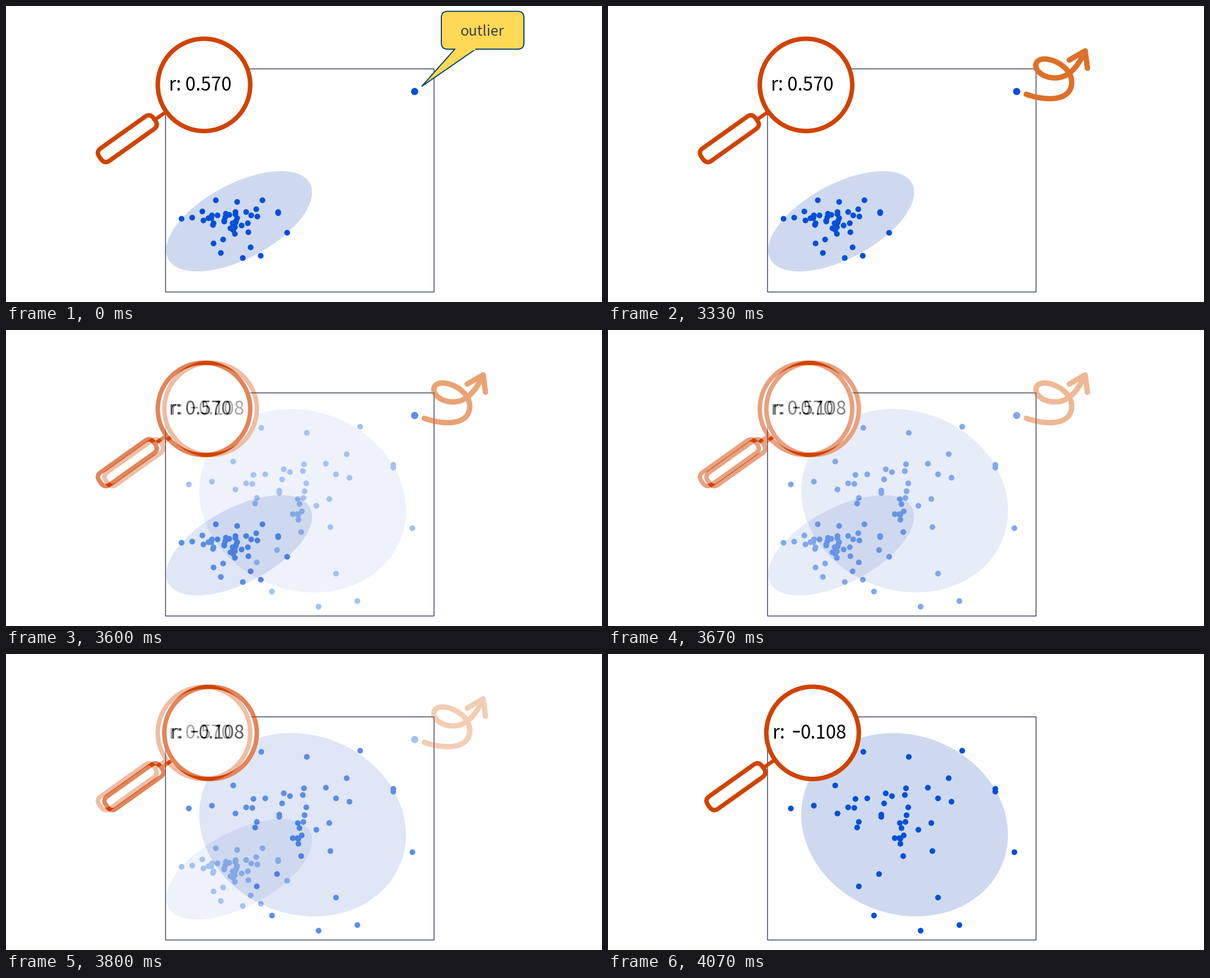
Recreate the animation shown at these times as a matplotlib script. Size 1061 px wide and 528 px high, loop 8.07 s.

```python
import numpy as np
import matplotlib.pyplot as plt
from matplotlib.animation import FuncAnimation
from matplotlib.patches import Circle, Ellipse, FancyBboxPatch, PathPatch, Rectangle
from matplotlib.path import Path
from matplotlib.transforms import Affine2D

W, H, DPI = 1061, 528, 64
PX = 72 / DPI  # points per pixel
LOOP, INTERVAL = 8070, 30
ARROW_AT, FADE_AT, STEP, STEPS = 1600, 3325, 200 / 3, 10

BLUE, PALE, NAVY = "#0050d7", "#ced9f0", "#2f3b5c"
RUST, ORANGE, YELLOW = "#d04300", "#de7028", "#ffd955"

plt.rcParams["font.family"] = ["Noto Sans CJK JP", "DejaVu Sans"]

# The rim of the cloud is fixed, its core is random.
RIM = [(325, 275), (454, 174), (535, 183), (630, 172), (689, 240), (689, 245),
       (723, 353), (625, 483), (556, 493), (473, 466), (587, 434), (446, 414)]
core = np.random.default_rng(7).normal((522, 296), (62, 48), (35, 2))
CLOUD = np.vstack([RIM, core])
# The outlier stretches both axes, so the same cloud shrinks.
SQUEEZED = (CLOUD - (325, 275)) * (0.4724, 0.3211) + (312, 379)

fig = plt.figure(figsize=(W / DPI, H / DPI), dpi=DPI, facecolor="white")


def text(ax, x, y, s, size, color="black", ha="left"):
    ax.text(x, y, s, fontsize=size * PX, color=color, ha=ha, va="baseline",
            zorder=8)


def dots(ax, points, diameter):
    x, y = np.transpose(points) - 0.3
    ax.scatter(x, y, s=(diameter * PX) ** 2, c=BLUE, linewidths=0, zorder=3)


def stroke(ax, path, color, width, fill="none"):
    ax.add_patch(PathPatch(path, fc=fill, ec=color, lw=width * PX,
                           capstyle="round", joinstyle="round", zorder=6))


def rounded(ax, x, y, w, h, radius, fill, edge, width, transform=None):
    ax.add_patch(FancyBboxPatch(
        (x, y), w, h, boxstyle=f"round,pad=0,rounding_size={radius}",
        fc=fill, ec=edge, lw=width * PX, zorder=7,
        transform=transform or ax.transData))


def plot_area(ax, points, center, w, h, angle):
    ax.add_patch(Ellipse(center, w, h, angle=angle, fc=PALE, lw=0))
    ax.add_patch(Rectangle((284, 112.2), 478, 398, fc="none", ec=NAVY,
                           lw=1.4 * PX, snap=False, zorder=2))
    dots(ax, points, 10.2)


def magnifier(ax, dx):
    ax.add_patch(Circle((352.5 + dx, 140.7), 82.3, fc="white", ec=RUST,
                        lw=8 * PX, zorder=4))
    stroke(ax, Path([(267 + dx, 201.5), (284 + dx, 189.5)]), RUST, 6.5)
    tilt = Affine2D().rotate_deg(-35.5).translate(216 + dx, 236.7)
    rounded(ax, -59.3, -13.6, 118.6, 27.2, 10.5, "white", RUST, 7.8,
            tilt + ax.transData)


def callout(ax):
    rounded(ax, 775, 9.5, 147, 67.5, 11, YELLOW, "#0b4470", 2)
    ax.add_patch(PathPatch(Path([(799, 77), (740, 143.5), (836, 77)]),
                           fc=YELLOW, ec="#0b4470", lw=2 * PX, zorder=7))
    ax.plot([800, 834.5], [76.8, 76.8], color=YELLOW, lw=3 * PX,
            solid_capstyle="butt", zorder=7.5)
    text(ax, 848, 53, "outlier", 25.3, "#404048", "center")


def curly_arrow(ax):
    curl = [(744.5, 157.5), (785, 171.5), (825.5, 168), (825.5, 136),
            (825.5, 112), (797, 94.5), (777, 94.5),
            (764, 94.5), (759.5, 103), (762.5, 111),
            (769, 126), (792, 131.5), (808, 126.5),
            (827, 121), (840, 100), (849, 82)]
    codes = [Path.MOVETO] + [Path.CURVE4] * (len(curl) - 1)
    stroke(ax, Path(curl, codes), ORANGE, 9.6)
    stroke(ax, Path([(821, 96.5), (849.5, 80), (853.5, 111)]), ORANGE, 9.6)


def with_outlier(ax):
    plot_area(ax, SQUEEZED, (415, 384), 286, 133, -28.2)
    dots(ax, [(727, 152)], 12.8)
    magnifier(ax, 0)
    text(ax, 289.5, 151, "r: 0.570", 33)


def labelled(ax):
    with_outlier(ax)
    callout(ax)


def leaving(ax):
    with_outlier(ax)
    curly_arrow(ax)


def without_outlier(ax):
    plot_area(ax, CLOUD, (528, 304.5), 375, 319, 21.4)
    magnifier(ax, 11.7)
    text(ax, 293, 151, "r:", 33)
    ax.plot([328.5, 341], [138, 138], color="black", lw=3 * PX,
            solid_capstyle="butt", zorder=8)
    text(ax, 342, 151, "0.108", 33)


def render(scene):
    """Draw a scene once and return it as an RGB array for cross-fading."""
    ax = fig.add_axes([0, 0, 1, 1])
    ax.set(xlim=(0, W), ylim=(H, 0))
    ax.axis("off")
    scene(ax)
    fig.canvas.draw()
    pixels = np.array(fig.canvas.buffer_rgba())[..., :3]
    ax.remove()
    return pixels


start, middle, end = map(render, (labelled, leaving, without_outlier))
stage = fig.figimage(start)


def fade(t):
    u = np.clip((t - FADE_AT) // STEP / STEPS, 0, 1)
    return u * u * (3 - 2 * u)


def update(i):
    t = i * INTERVAL + 10
    if t < ARROW_AT:
        picture = start
    else:
        k = fade(t)
        picture = (middle * (1 - k) + end * k).round().astype(np.uint8)
    stage.set_data(picture)
    return [stage]


anim = FuncAnimation(fig, update, frames=LOOP // INTERVAL, interval=INTERVAL,
                     repeat=True, repeat_delay=0, blit=False)
plt.show()
```
